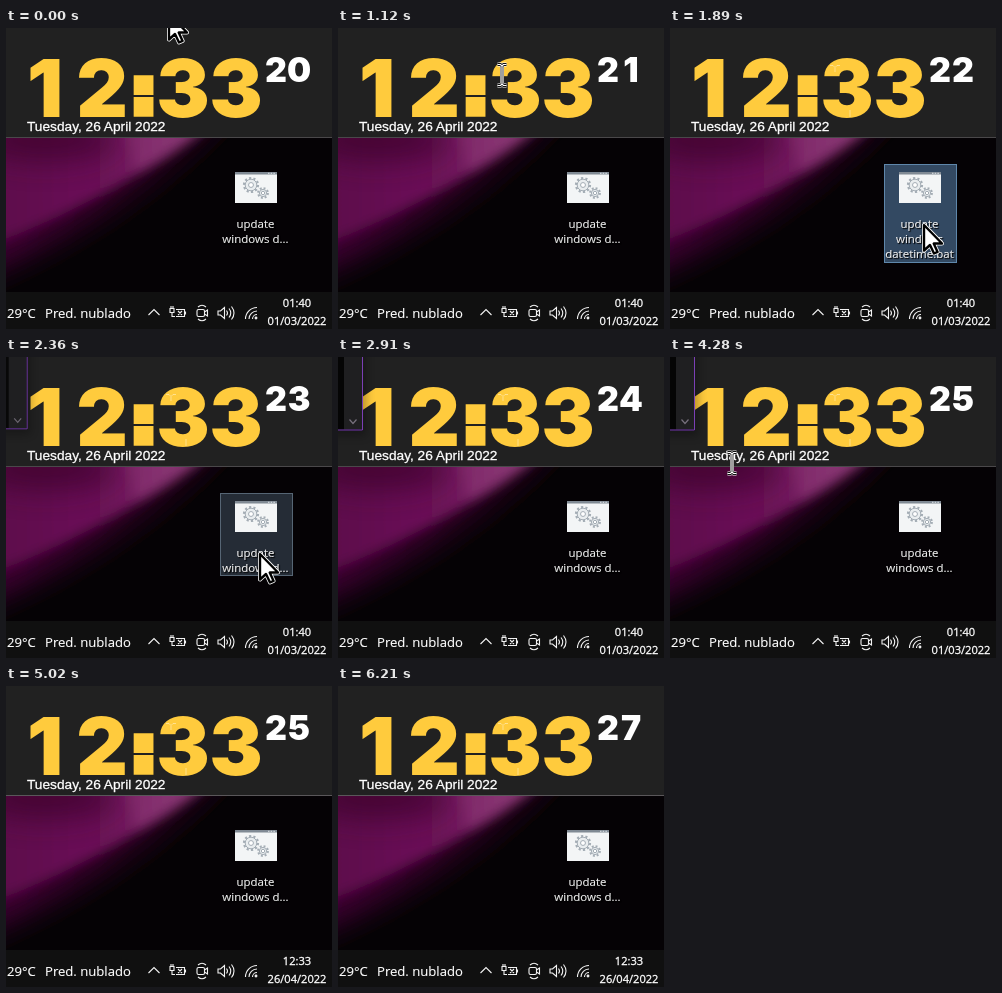
An HTML page that plays this animation: 326x301 px, repeating every 7.15 s.

```html
<!DOCTYPE html>
<html lang="en">
<head>
<meta charset="utf-8">
<title>Desktop clock sync</title>
<style>
  html, body { margin: 0; width: 100%; height: 100%; overflow: hidden; background: #050205; }
  svg { display: block; width: 326px; height: 301px; }
  .big { font: 900 80px Inter, sans-serif; fill: #ffcb3d; text-anchor: middle; }
  .big .colon { font: 700 59px "Liberation Sans", Arial, sans-serif; stroke: #ffcb3d; stroke-width: 11.5; }
  .sec { font: 900 34px Inter, sans-serif; fill: #fff; text-anchor: middle; }
  .date { font: 13.7px "Liberation Sans", Arial, sans-serif; fill: #fff; stroke: #fff; stroke-width: .3; }
  .bar, .tray, .label { font: 13.1px "Open Sans", "Noto Sans", sans-serif; fill: #fff; stroke: #fff; stroke-width: .15; }
  .tray { font-size: 11.1px; text-anchor: middle; stroke-width: .3; }
  .label { font-size: 11.5px; text-anchor: middle; text-shadow: 1px 1px 1px #000; }
  .line { fill: none; stroke: #f2f2f2; stroke-width: 1.1; }
</style>
</head>
<body>
<svg viewBox="0 0 326 301" xmlns="http://www.w3.org/2000/svg">
  <defs>
    <linearGradient id="beam" gradientUnits="userSpaceOnUse" x1="0" x2="200" y1="0" y2="0">
      <stop offset="0" stop-color="#5e0a4c"/>
      <stop offset=".5" stop-color="#6c1258"/>
      <stop offset="1" stop-color="#8c3a78"/>
    </linearGradient>
    <linearGradient id="halo" gradientUnits="userSpaceOnUse" x1="0" x2="300" y1="0" y2="0">
      <stop offset="0" stop-color="#3c0530"/>
      <stop offset="1" stop-color="#16040f"/>
    </linearGradient>
    <filter id="soft" filterUnits="userSpaceOnUse" x="-80" y="40" width="480" height="300"><feGaussianBlur stdDeviation="14"/></filter>
    <filter id="mid" filterUnits="userSpaceOnUse" x="-80" y="40" width="480" height="300"><feGaussianBlur stdDeviation="6"/></filter>
    <filter id="shade"><feGaussianBlur stdDeviation="5"/></filter>
    <clipPath id="desk"><rect y="109" width="326" height="156"/></clipPath>
    <g id="corner">
      <rect x="-200" y="-200" width="203" height="205" opacity=".3" filter="url(#shade)"/>
      <rect x="-200" y="-200" width="200" height="200" fill="#050505"/>
      <rect x="-19" y="-200" width="18" height="199" fill="#1f1f21"/>
      <path d="M-200-.5H-.5V-200" fill="none" stroke="#7b3fb5"/>
      <path d="M-13.500-11l3.500 4 3.500-4" fill="none" stroke="#77707d" stroke-width="1.200"/>
    </g>
    <path id="pointerShape" d="M0 0V25.500L6 20l4 8.500 3.600-1.600L9.700 18.500H18Z" stroke-linejoin="round"/>
    <path id="beamShape" d="M-4.500-10.500h3l1.500 1.500 1.500-1.500h3M0-9v18M-4.500 10.500h3L0 9l1.500 1.500h3"/>
  </defs>

  <g clip-path="url(#desk)">
    <rect y="109" width="326" height="156" fill="#050205"/>
    <path d="M-60 60H250Q130 195-60 262Z" fill="url(#halo)" filter="url(#soft)"/>
    <path d="M-40 80H222Q118 170-40 226Z" fill="url(#beam)" filter="url(#mid)"/>
    <ellipse cx="40" cy="112" rx="70" ry="22" fill="#380428" opacity=".65" filter="url(#soft)"/>
    <path d="M120 100H200Q170 130 130 144Z" fill="#98477f" opacity=".3" filter="url(#mid)"/>
  </g>

  <rect width="326" height="109" fill="#212121"/>
  <path id="edge" d="M0 109.500H326"/>
  <g class="big">
    <text x="39" y="88.500">1</text><text x="96" y="88.500">2</text><text class="colon" x="137.500" y="83">:</text>
    <text x="177" y="88.500">3</text><text x="230" y="88.500">3</text>
  </g>
  <path id="ghost" d="M160 37.500h3l2 2 2-2h3M165 40v4M180 82v7" fill="none" stroke="#fff0c4" opacity=".6"/>
  <g class="sec"><text x="270" y="53.500">2</text><text id="unit" x="293" y="53.500">0</text></g>
  <text class="date" x="21" y="103">Tuesday, 26 April 2022</text>

  <rect id="pick" x="214.500" y="136.500" width="72" height="82"/>
  <rect x="229" y="144" width="42" height="31" fill="#f3f5f6"/>
  <path d="M229 144h42v2.500h-42z" fill="#808a94"/>
  <path d="M262 145.300h7" stroke="#dfe4e8" stroke-dasharray="1.500 1.200"/>
  <g id="gears" fill="none" stroke="#a4adb5"></g>
  <g class="label">
    <text x="249.500" y="200">update</text>
    <text id="row2" x="249.500" y="215">windows d...</text>
    <text id="row3" x="249.500" y="230">datetime.bat</text>
  </g>

  <rect y="264" width="326" height="37" fill="#101010"/>
  <g class="bar" id="wide"><text x="1" y="290">29°C</text><text x="39" y="290">Pred. nublado</text></g>
  <g class="bar" id="slim">
    <g stroke="none">
      <circle cx="72" cy="282" r="6.800" fill="#ffc02e"/>
      <path d="M70 293.500a4.500 4.500 0 0 1 0-9 6 6 0 0 1 10.500-.5 4.800 4.800 0 0 1 .5 9.500z" fill="#dce9f7"/>
    </g>
    <text x="95" y="290">29°C</text>
  </g>
  <g class="line">
    <path d="M142.500 287l5.500-5.500 5.500 5.500"/>
    <path d="M170 281.500h8.500v7H170M179.500 283.500v3M164 280.500h4v4h-4zM165 278v2.500M167 278v2.500M166 284.500v4h3M172 283l4 4M176 283l-4 4"/>
    <rect x="191" y="281.500" width="7.500" height="7" rx="1.500"/>
    <path d="M198.500 284l3-2v6l-3-2M192 279q4-3.500 8 0M192 291q4 3.500 8 0"/>
    <path d="M212 283h2.500l4-3.500v11l-4-3.500H212zM220.500 282.500q2 2.500 0 5M223 280.500q3.500 4.500 0 9M225.500 278.500q5 6.500 0 13"/>
    <path d="M239.500 291a11.500 11.500 0 0 1 11.500-11.500M243 291a8 8 0 0 1 8-8M246.500 291a4.500 4.500 0 0 1 4.500-4.500"/>
    <circle cx="250" cy="290" r=".9" fill="#fff"/>
  </g>
  <text class="tray" id="time" x="291" y="278.500"></text>
  <text class="tray" id="day" x="291" y="296.500"></text>

  <use id="win1" href="#corner"/>
  <use id="win2" href="#corner"/>

  <g id="arrow" fill="#fff">
    <use href="#pointerShape" stroke="#fff" stroke-width="4"/>
    <use href="#pointerShape" stroke="#000" stroke-width="2.400"/>
  </g>
  <g id="caret" fill="none">
    <use href="#beamShape" stroke="#fff" stroke-width="4"/>
    <use href="#beamShape" stroke="#111" stroke-width="2.800"/>
    <use href="#beamShape" stroke="#fff" stroke-width="1.200"/>
  </g>
</svg>
<script>
const LOOP = 7150, STEP = 67;
const $ = id => document.getElementById(id);
const clamp = v => Math.max(0, Math.min(1, v));
const mix = (a, b, p) => a + (b - a) * p;
const show = (id, on) => $(id).setAttribute('visibility', on ? 'visible' : 'hidden');

function attrs(id, list) {
  for (const k in list) $(id).setAttribute(k, list[k]);
}

function put(id, x, y) {
  attrs(id, { transform: `translate(${x} ${y})` });
}

function gear(x, y, r, teeth) {
  const pitch = Math.PI * r / teeth;
  return `<circle cx="${x}" cy="${y}" r="${r}" stroke-width="2.2" stroke-dasharray="${pitch}"/>` +
    `<circle cx="${x}" cy="${y}" r="${r - 1.2}" fill="#e9edef"/>` +
    `<circle cx="${x}" cy="${y}" r="${r * 0.35}" fill="#fff"/>`;
}
$('gears').innerHTML = gear(245, 157, 7, 10) + gear(257, 165, 4.8, 8);

function stepped(t) {
  for (const [from, to] of [[1120, 1470], [1890, 2500], [2770, 2910], [4280, 4890]])
    if (t >= from && t < to) return from + Math.floor((t - from) / STEP) * STEP;
  return t;
}

// Rows: time, x, y of the pointer.
const descend = [[1120, 164, 47], [1187, 181, 78], [1321, 229, 157], [1388, 248, 185], [1455, 254, 197]];
const leave = [[4280, 62, 106], [4414, 74, 84], [4548, 104, 48], [4682, 128, 20], [4816, 138, -26]];

function along(path, t) {
  let i = 0;
  while (i < path.length - 2 && t >= path[i + 1][0]) i++;
  const [a, b] = [path[i], path[i + 1]];
  const p = clamp((t - a[0]) / (b[0] - a[0]));
  return [mix(a[1], b[1], p), mix(a[2], b[2], p)];
}

function pointer(t) {
  let arrow = null, caret = null;
  if (t < 1120) arrow = [163, -14];
  else if (t < 2770) {
    const at = along(descend, t);
    if (at[1] < 110) caret = at; else arrow = at;
  } else if (t >= 4280 && t < 4880) caret = along(leave, t);
  show('arrow', arrow);
  show('caret', caret);
  if (arrow) put('arrow', ...arrow);
  if (caret) put('caret', ...caret);
}

function icon(t) {
  const chosen = t >= 1890 && t < 2290;
  let look = ['#9ab8d4', 0.2, '#56606e'];
  if (chosen) look = ['#6fa8dc', 0.43, '#5f87ab'];
  else if (t >= 2290) look = ['#85a8c8', 0.25, '#566574'];
  const fade = t < 2770 ? clamp((t - 1320) / 130) : clamp(1 - (t - 2700) / 200);
  attrs('pick', { fill: look[0], 'fill-opacity': look[1], stroke: look[2], opacity: fade, height: chosen ? 98 : 82 });
  $('row2').textContent = chosen ? 'windows' : 'windows d...';
  show('row3', chosen);
}

function windows(t) {
  const open = clamp((t - 2225) / 200), shut = clamp((t - 4300) / 200);
  put('win1', mix(15, 25, open) - 10 * shut, mix(70, 73.5, open) - 6 * shut);
  attrs('win1', { opacity: Math.min(1, open * 1.3) * (1 - shut) });
  const next = t < 5020 ? clamp((t - 4542) / 175) : 0;
  put('win2', mix(16, 51, next), mix(79, 99.5, next));
  attrs('win2', { opacity: next });
}

function draw(ms) {
  const t = stepped(ms);
  const ticks = [130, 1180, 2120, 2830, 4280, 5220, 6210];
  $('unit').textContent = ticks.filter(x => t >= x).length;
  const synced = t >= 4810, slim = t >= 4480 && t < 4880;
  $('time').textContent = synced ? '12:33' : '01:40';
  $('day').textContent = synced ? '26/04/2022' : '01/03/2022';
  show('wide', !slim);
  show('slim', slim);
  show('ghost', t >= 1180);
  attrs('edge', { stroke: t >= 5020 ? '#5a575a' : '#4a484a' });
  icon(t);
  windows(t);
  pointer(t);
}

const start = performance.now();
function tick() {
  draw((performance.now() - start) % LOOP);
  requestAnimationFrame(tick);
}
tick();
</script>
</body>
</html>
```
